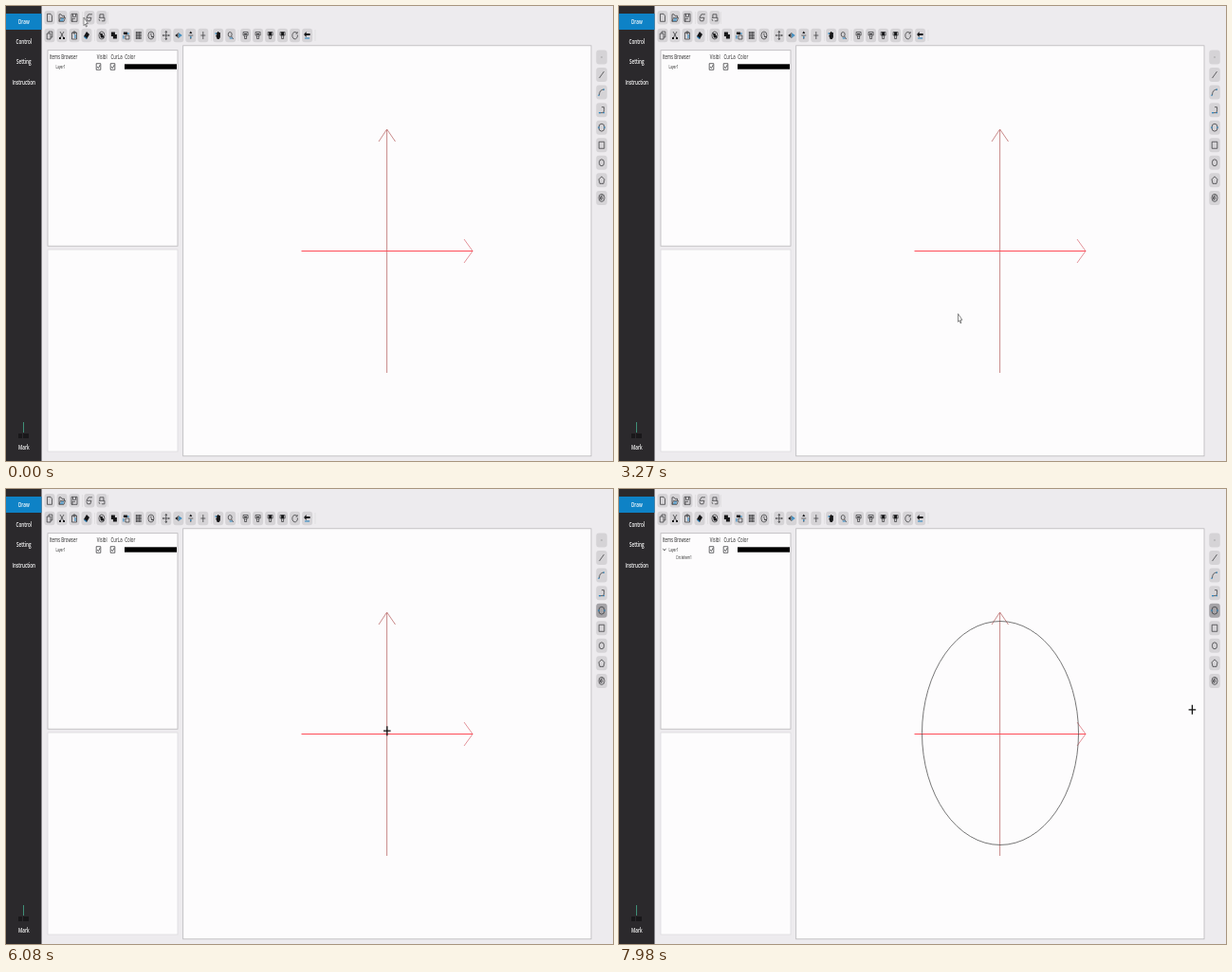
These frames come from a looping animation (640 by 480 pixels, 8 s). An HTML page:

```html
<!DOCTYPE html>
<html lang="en">
<head>
<meta charset="utf-8">
<title>Drawing a circle</title>
<style>
  html, body { margin: 0; width: 100%; height: 100%; overflow: hidden; background: #edebee; }
  svg { display: block; width: 640px; height: 480px; }
  text { font: 6.3px "Open Sans", "Noto Sans", sans-serif; fill: #222; }
  .menu text { font-size: 6.6px; font-weight: 600; fill: #fff; text-anchor: middle; }
  .small text { font-size: 4.6px; }
  .line { fill: none; stroke: #3a3a3c; stroke-width: .75; }
  .solid { fill: #151517; }
  .blue { fill: none; stroke: #2c86c0; stroke-width: 1.1; }
  .panel { fill: #fdfcfd; stroke: #b9b7ba; stroke-width: .8; }
</style>
</head>
<body>
<svg viewBox="0 0 640 480">
  <rect width="640" height="480" fill="#edebee"/>
  <rect width="37.5" height="480" fill="#2b292c"/>
  <rect y="8" width="37.5" height="17" fill="#0e82c6"/>
  <g class="menu" id="menu"></g>
  <path d="M18.5 439V450" stroke="#3f8f78"/>
  <path d="M13 451h4v5h-4zM18 451h6v5h-6z" fill="#19181a"/>
  <rect class="panel" x="44" y="46.7" width="137" height="206.5"/>
  <rect class="panel" x="44" y="257" width="137" height="213" style="stroke:#dddbde"/>
  <rect class="panel" x="186.7" y="41.8" width="430.3" height="433"/>
  <path d="M80.5 6V19M107.5 6V19M93.5 25V37M161 25V37M216.500 25V37M245 25V37M326 25V37" stroke="#dad8db" stroke-width=".6"/>
  <g id="labels"></g>
  <g class="small" id="rows"></g>
  <path class="line" d="M95.200 60.700h4.600v6.600h-4.600zM110.200 60.700h4.600v6.600h-4.600zM96.200 64l1.200 1.600 1.700-3.400M111.200 64l1.200 1.600 1.700-3.400"/>
  <rect x="125" y="61.300" width="55" height="5.400"/>
  <g id="buttons"></g>

  <g fill="none">
    <path d="M401.600 130V387M393 143L401.600 130 410.500 143" stroke="#c27c7c" stroke-width=".9"/>
    <path d="M483 246L492 258.500 483 271" stroke="#dc7880" stroke-width=".8"/>
    <path d="M311.500 258.500H492" stroke="#ff4c58"/>
    <ellipse id="circle" cx="402" cy="257.500" stroke="#4a4a4a" stroke-width=".75"/>
  </g>
  <g id="item" class="small">
    <path class="line" d="M46.300 62.800l1.600 2.200 1.600-2.200"/>
  </g>
  <path id="arrow" d="M0 0V8.600L1.400 7 2.500 10 3.400 9.500 2.400 6.500H4.400Z" fill="#fff" stroke="#555" stroke-width=".7"/>
  <path id="cross" d="M-3.800 0H3.800M0-5V5" stroke="#111" stroke-width="1.300"/>
</svg>
<script>
const LOOP = 8000;
const SQUASH = 0.7;
const $ = id => document.getElementById(id);
const add = (id, markup) => $(id).insertAdjacentHTML("beforeend", markup);
const label = (id, x, y, text) =>
  add(id, `<text transform="translate(${x} ${y}) scale(${SQUASH} 1)">${text}</text>`);

label("menu", 18.8, 18.8, "Draw");
label("menu", 18.8, 40.1, "Control");
label("menu", 18.8, 61.4, "Setting");
label("menu", 18.8, 82.8, "Instruction");
label("menu", 18.8, 468.4, "Mark");
label("labels", 45.7, 56.2, "Items Browser");
label("labels", 95.8, 56.2, "Visibl");
label("labels", 110.6, 56.2, "CurLa");
label("labels", 125.3, 56.2, "Color");
label("rows", 52.5, 65.8, "Layer1");
label("item", 60, 73.6, "CircleItem1");

// Icon paths around their own middle: outline, solid part, blue part
const RING = "M-3 0a3 4 0 1 0 6 0a3 4 0 1 0-6 0";
const STAMP = "M-2.500-3.500H2.500V0H-2.500ZM-1 0V3.500H1V0";
const ICONS = {
  page: ["M-2.500-4H1L2.500-2V4H-2.500Z"],
  open: ["M-3 4V-3.500H-1L0-2H2.500V0M-3 4L-1.500 0H3.500L2 4Z", "", "M-1 1.500H2M-2 3H1.500"],
  save: ["M-3-4H3V4H-3ZM-1.500-4V-1H1.500V-4M-2 4V1H1"],
  back: ["M3-3.500H-1L-3 0H2L1 3.500H-2L-3 1"],
  forward: ["M-2 0V-3.500H2V0M-3 0H3V3.500H0M-2 3.500L-3 1.500"],
  copy: ["M-2.800-2H1V4H-2.800ZM-1-2V-4H2.800V2H1"],
  cut: ["M-2-4L1.500 2M2-4L-1.500 2", "M-3 2H-1V4H-3ZM1 2H3V4H1Z"],
  paste: ["M-2.500-3H2.500V4H-2.500ZM-1-4H1V-2H-1Z", "", "M1-1V3"],
  erase: ["", "M-3 1L0-4 3-1 0 4Z", "M-2.500 1.500L0 3.500"],
  ban: [RING + "M-2-3L2 3", "M-1.800-2H1V0H2V2.500H-1Z"],
  union: ["", "M-3-3.500H1V-1H3V3.500H-1V1H-3Z"],
  swap: ["M-1 0H3V4H-1Z", "M-3-3.500H1V-1H-3Z", "M-3 0V3.500M2-3V-1"],
  hatch: ["M-2.500-4V4M-1-4V4M.5-4V4M2-4V4M-3-3H3M-3 0H3M-3 3H3"],
  clock: [RING + "M0-2.500V0L2 2M0 1.500H3"],
  move: ["M-3.500 0H3.500M0-4.500V4.500M-1-3L0-4.500 1-3M-1 3L0 4.500 1 3M-2.500-1L-3.500 0-2.500 1M2.500-1L3.500 0 2.500 1"],
  flipX: ["M0-3V3", "M-3.500 0L-1-2V2Z", "M1-1.500V1.500L3 0Z"],
  flipY: ["M-2.500 0H2.500M0 1V4", "M-1.500-2L0-4.500 1.500-2Z", "M0 1V3"],
  plus: ["M-2.500 0H2.500M0-4V4"],
  hand: ["", "M-2.500 0L-1.500-.5V-3H-.6V-4H.6V-3H2.200V2L1 4H-1Z", "M-2.500-3V-1"],
  zoom: ["M-2.500-1a2 2.500 0 1 0 4 0a2 2.500 0 1 0-4 0M1 1L3 4", "", "M-1 3H2"],
  stamp: [STAMP, "M-1.500-2H1.500V-1H-1.500Z"],
  stampDark: [STAMP, "M-1.500-3.500H1.500V0H-1.500Z"],
  turn: ["M2-2.500a2.800 3.700 0 1 0 .8 2M2.500-4V-2H.8"],
  exit: ["", "M-3.500-1L-1-4V-2H3V0H-1V2Z", "M-2.500 3H2.500"],
  dot: ["M-.4 0H.4"],
  line: ["M-2.500 3.500L2.500-3.500"],
  arc: ["M-2.500 3Q-2.500-3 2.500-3", "", "M-3 2.500V4M1.500-3H3"],
  poly: ["M-2.500 3H1Q3 3 2.500-3H0", "", "M-3 3H-1M1.500 3H3"],
  circle: [RING, "", "M-3-1V1M3-1V1"],
  square: ["M-2.800-3.500H2.800V3.500H-2.800Z"],
  ellipse: ["M-2.600 0a2.600 3.500 0 1 0 5.200 0a2.600 3.500 0 1 0-5.200 0"],
  pentagon: ["M0-4L3-1 2 3.500H-2L-3-1Z"],
  spiral: [RING + "M0 1a1 1 0 1 1 1-1.500Q1 3-1.500 1.500Q-2-3 1.500-2.500"],
};

function button(name, x, y, w = 11, h = 14.5) {
  const [line, solid = "", blue = ""] = ICONS[name];
  add("buttons", `<g id="${name}Button" transform="translate(${x} ${y})">
    <rect x="${-w / 2}" y="${-h / 2}" width="${w}" height="${h}" rx="3" fill="#d5d3d6"/>
    <path class="line" d="${line}"/><path class="solid" d="${solid}"/><path class="blue" d="${blue}"/></g>`);
}
// "|" marks a wider gap between groups
function toolbar(y, names) {
  let x = 46;
  for (const name of names.split(" ")) {
    if (name === "|") { x += 2.9; continue; }
    button(name, x, y);
    x += 13;
  }
}
toolbar(12.3, "page open save | back forward");
toolbar(31, "copy cut paste erase | ban union swap hatch clock | move flipX flipY plus | hand zoom | stamp stamp stampDark stampDark turn exit");
"dot line arc poly circle square ellipse pentagon spiral".split(" ")
  .forEach((name, i) => button(name, 628, 54 + i * 18.55, 11.5, 15));

// Pointer path: time, x, y
const PATH = [
  [0, 82, 12], [1090, 82, 12], [1300, 307, 63], [1810, 444, 114],
  [1930, 444, 114], [2270, 515, 120], [2640, 519, 113],
  [2760, 519, 113], [3170, 343, 345], [3470, 398, 268],
  [3730, 398, 268], [4270, 618, 125.5], [4470, 626, 122],
  [4600, 626, 122], [5380, 376, 215.5], [5410, 371, 220], [5640, 358, 194], [6240, 411, 268],
  [6270, 411, 268], [6510, 409.5, 266.5], [6700, 409.5, 266.5], [6740, 408.5, 266],
  [6970, 408.5, 266], [7080, 425, 266], [7750, 491, 266.5],
  [7790, 491, 266.5], [7980, 604, 233], [8000, 610, 231],
];
const slope = (i, k) => (PATH[i + 1][k] - PATH[i][k]) / (PATH[i + 1][0] - PATH[i][0]);
function tangent(i, k) {
  if (i === 0 || i === PATH.length - 1) return 0;
  const a = slope(i - 1, k), b = slope(i, k);
  return a * b > 0 ? 2 * a * b / (a + b) : 0;
}
// Monotone cubic through the path points; k is 1 for x, 2 for y
function pointer(t, k) {
  const i = Math.max(0, PATH.findIndex(p => p[0] > t) - 1);
  const [p, q] = [PATH[i], PATH[i + 1]];
  const d = q[0] - p[0], u = (t - p[0]) / d, v = 1 - u;
  return p[k] * v * v * (1 + 2 * u) + q[k] * u * u * (3 - 2 * u)
    + d * u * v * (tangent(i, k) * v - tangent(i + 1, k) * u);
}

const show = (el, on) => { el.style.display = on ? "" : "none"; };
const pressable = $("circleButton").querySelector("rect");

function draw(t) {
  const x = pointer(t, 1), y = pointer(t, 2);
  const drawing = t >= 4610 && x < 617;
  for (const id of ["arrow", "cross"]) {
    $(id).setAttribute("transform", `translate(${x} ${y})`);
    show($(id), (id === "cross") === drawing);
  }
  pressable.setAttribute("fill", t >= 4610 ? "#a5a3a7" : "#d5d3d6");

  // The circle trails the pointer a little while it is dragged out
  const radius = Math.max(0, pointer(Math.min(t, 7780) - 20, 1) - 408.5);
  $("circle").setAttribute("rx", radius);
  $("circle").setAttribute("ry", radius * 1.43);
  show($("circle"), t >= 6980);
  show($("item"), t >= 7780);
}
function tick() {
  draw(performance.now() % LOOP);
  requestAnimationFrame(tick);
}
tick();
</script>
</body>
</html>
```
